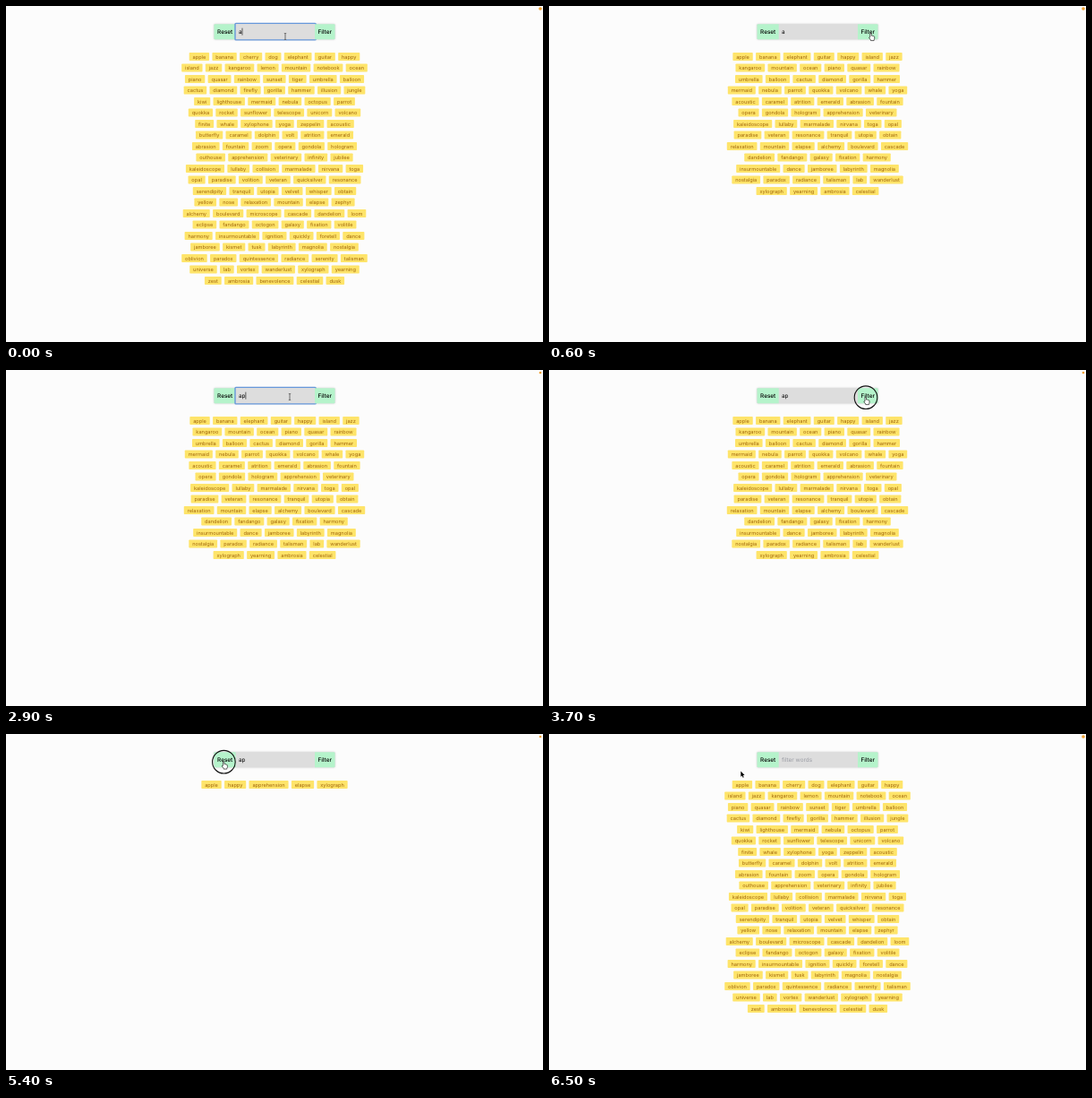
An HTML page that plays this animation: 600 by 375 pixels, repeating every 6.6 s.

```html
<!DOCTYPE html>
<html lang="en">
<head>
<meta charset="utf-8">
<title>Word filter</title>
<style>
html, body { margin: 0; width: 100%; height: 100%; overflow: hidden; background: #fcfcfc; }
svg { display: block; width: 600px; height: 375px; }
text { font-family: Inter, "Liberation Sans", sans-serif; text-rendering: geometricPrecision; white-space: pre; }
.tag { font-size: 5.64px; fill: #a1660a; text-anchor: middle; }
.bar text { font-size: 6.4px; }
.button { font-weight: 500; text-anchor: middle; }
.shadow { filter: drop-shadow(0 .8px 1px rgba(0, 0, 0, .2)); }
</style>
</head>
<body>
<svg id="stage" viewBox="0 0 600 375">
  <rect width="600" height="375" fill="#fcfcfc"/>
  <g id="lists"></g>
  <g class="bar">
    <rect class="shadow" x="232.5" y="20.2" width="135" height="17" rx="1" fill="#ddd"/>
    <path d="M256.7 20.2h-23.2a1 1 0 0 0-1 1v15a1 1 0 0 0 1 1h23.2z" fill="#b5f3cb"/>
    <text class="button" x="244.7" y="30.9">Reset</text>
    <rect id="focus" x="256" y="19.4" width="90.2" height="18.5" rx=".9" fill="#ddd" stroke="#6698da" stroke-width="1.4"/>
    <path d="M345 20.2h21.5a1 1 0 0 1 1 1v15a1 1 0 0 1-1 1H345z" fill="#b5f3cb"/>
    <text class="button" x="356.2" y="30.9">Filter</text>
    <text id="value" x="260" y="30.9"></text>
    <rect id="caret" y="24.6" width=".6" height="8" fill="#000"/>
  </g>
  <circle id="dot" cx="597" cy="3" fill="#f0a030"/>
  <g id="cursor" stroke-linejoin="round">
    <circle id="ring" r="12.8" cx=".2" cy=".2" fill="none" stroke="#111" stroke-width="1.1"/>
    <path id="hand" d="M-.8 4.2V.6a.75.75 0 0 1 1.5 0V2.6q1-.5 1.3.2 1-.3 1.2.5 1-.1 1 .9v1.5q0 1-.6 1.7v.7H0v-.6l-1.8-2.4q-.5-1 .9-.6z" fill="#fff" stroke="#000" stroke-width=".6"/>
    <path id="arrow" d="M0 0V6.3L1.4 5l1 2.2 1-.4-1-2.2h1.9z" stroke="#fff" stroke-width=".5" paint-order="stroke"/>
    <g id="beam" fill="none">
      <path d="M-1.2-3.6Q-.2-3.6 0-3V3Q-.2 3.6-1.2 3.6M1.2-3.6Q.2-3.6 0-3M0 3Q.2 3.6 1.2 3.6" stroke="#fff" stroke-opacity=".6" stroke-width="1.3"/>
      <path d="M-1.2-3.6Q-.2-3.6 0-3V3Q-.2 3.6-1.2 3.6M1.2-3.6Q.2-3.6 0-3M0 3Q.2 3.6 1.2 3.6" stroke="#111" stroke-width=".65"/>
    </g>
  </g>
</svg>
<script>
const LOOP = 6600, STEP = 100;
const ROWS = `apple banana cherry dog elephant guitar happy
island jazz kangaroo lemon mountain notebook ocean
piano quasar rainbow sunset tiger umbrella balloon
cactus diamond firefly gorilla hammer illusion jungle
kiwi lighthouse mermaid nebula octopus parrot
quokka rocket sunflower telescope unicorn volcano
finite whale xylophone yoga zeppelin acoustic
butterfly caramel dolphin volt atrition emerald
abrasion fountain zoom opera gondola hologram
outhouse apprehension veterinary infinity jubilee
kaleidoscope lullaby collision marmalade nirvana toga
opal paradise volition veteran quicksilver resonance
serendipity tranquil utopia velvet whisper obtain
yellow nose relaxation mountain elapse zephyr
alchemy boulevard microscope cascade dandelion loom
eclipse fandango octogon galaxy fixation volitile
harmony insurmountable ignition quickly foretell dance
jamboree kismet tusk labyrinth magnolia nostalgia
oblivion paradox quintessence radiance serenity talisman
universe lab vortex wanderlust xylograph yearning
zest ambrosia benevolence celestial dusk`.split('\n').map(row => row.split(' '));

const $ = id => document.getElementById(id);
const show = (el, on) => el.setAttribute('visibility', on ? 'visible' : 'hidden');
const pen = document.createElement('canvas').getContext('2d');
pen.font = '100px Inter, "Liberation Sans", sans-serif';
const textWidth = (text, size) => pen.measureText(text).width * size / 100;

function add(parent, name, attrs, text = '') {
  const el = document.createElementNS('http://www.w3.org/2000/svg', name);
  for (const key in attrs) el.setAttribute(key, attrs[key]);
  el.textContent = text;
  parent.append(el);
  return el;
}

// Centred rows of tags
function buildList(rows) {
  const pad = 3.83, gap = 3.33, height = 9.17, pitch = 12.5;
  const list = add($('lists'), 'g', {});
  rows.forEach((words, i) => {
    const widths = words.map(word => textWidth(word, 5.64) + 2 * pad);
    const total = widths.reduce((a, b) => a + b) + gap * (words.length - 1);
    const y = 51.9 + i * pitch;
    let x = 300 - total / 2;
    words.forEach((word, j) => {
      add(list, 'rect', { x, y, width: widths[j], height, rx: 0.8, fill: '#fee46a' });
      add(list, 'text', { class: 'tag', x: x + widths[j] / 2, y: y + 6.6 }, word);
      x += widths[j] + gap;
    });
  });
  return list;
}

function matching(part, counts) {
  const words = ROWS.flat().filter(word => word.includes(part));
  return counts.map(n => words.splice(0, n));
}

const lists = {
  all: buildList(ROWS),
  a: buildList(matching('a', [7, 6, 6, 7, 6, 5, 6, 6, 6, 5, 5, 6, 4])),
  ap: buildList(matching('ap', [5]))
};

// [time, value]: each value holds until the next
const LIST = [[0, 'all'], [600, 'a'], [3800, 'ap'], [5500, 'all']];
const VALUE = [[0, 'a'], [2800, 'ap'], [5500, '']];
const FOCUS = [[0, true], [500, false], [1200, true], [3700, false]];
const CARET = [[0, true], [500, false], [1200, true], [1500, false], [2100, true],
  [2600, false], [2800, true], [3300, false]];
const RING = [[0, false], [500, true], [600, false], [3700, true], [3800, false],
  [5400, true], [5500, false]];

// [time, ...numbers]: eased between entries
const POINTER = [[0, 312, 34], [400, 359.5, 30.5], [800, 359.5, 30.5], [1200, 317, 30],
  [3400, 317, 30], [3700, 353.8, 30.5], [3900, 353.8, 30.5], [4100, 352, 30.5],
  [4400, 352, 30.5], [5100, 243.2, 31], [6000, 243.2, 31], [6500, 214.3, 41.5]];
const DOT = [[0, 1.8], [2200, 1.8], [3000, 1.35], [5400, 1.35], [6000, 1.8]];

const held = (steps, t) => steps.findLast(step => step[0] <= t)[1];

function eased(keys, t) {
  const i = keys.findLastIndex(key => key[0] <= t);
  const from = keys[i], to = keys[i + 1] || from;
  const p = to === from ? 0 : (t - from[0]) / (to[0] - from[0]);
  const k = p * p * (3 - 2 * p);
  return from.slice(1).map((v, j) => v + (to[j + 1] - v) * k);
}

function cursorAt(x, y) {
  if (x < 232.5 || x > 367.5 || y < 20 || y > 37.2) return 'arrow';
  return x > 256.7 && x < 345 ? 'beam' : 'hand';
}

function draw(t) {
  const list = held(LIST, t), value = held(VALUE, t);
  for (const key in lists) lists[key].style.display = key === list ? '' : 'none';

  $('value').textContent = value || 'filter words';
  $('value').setAttribute('fill', value ? '#000' : '#999ba3');
  show($('focus'), held(FOCUS, t));
  show($('caret'), held(CARET, t));
  $('caret').setAttribute('x', 260.1 + textWidth(value, 6.4));

  const [x, y] = eased(POINTER, t), kind = cursorAt(x, y);
  $('cursor').setAttribute('transform', `translate(${x} ${y})`);
  for (const name of ['hand', 'arrow', 'beam']) show($(name), name === kind);
  show($('ring'), held(RING, t));
  $('dot').setAttribute('r', eased(DOT, t)[0]);
}

const start = performance.now();
function tick() {
  const t = (performance.now() - start) % LOOP;
  draw(Math.floor(t / STEP) * STEP);
  requestAnimationFrame(tick);
}
tick();
</script>
</body>
</html>
```
